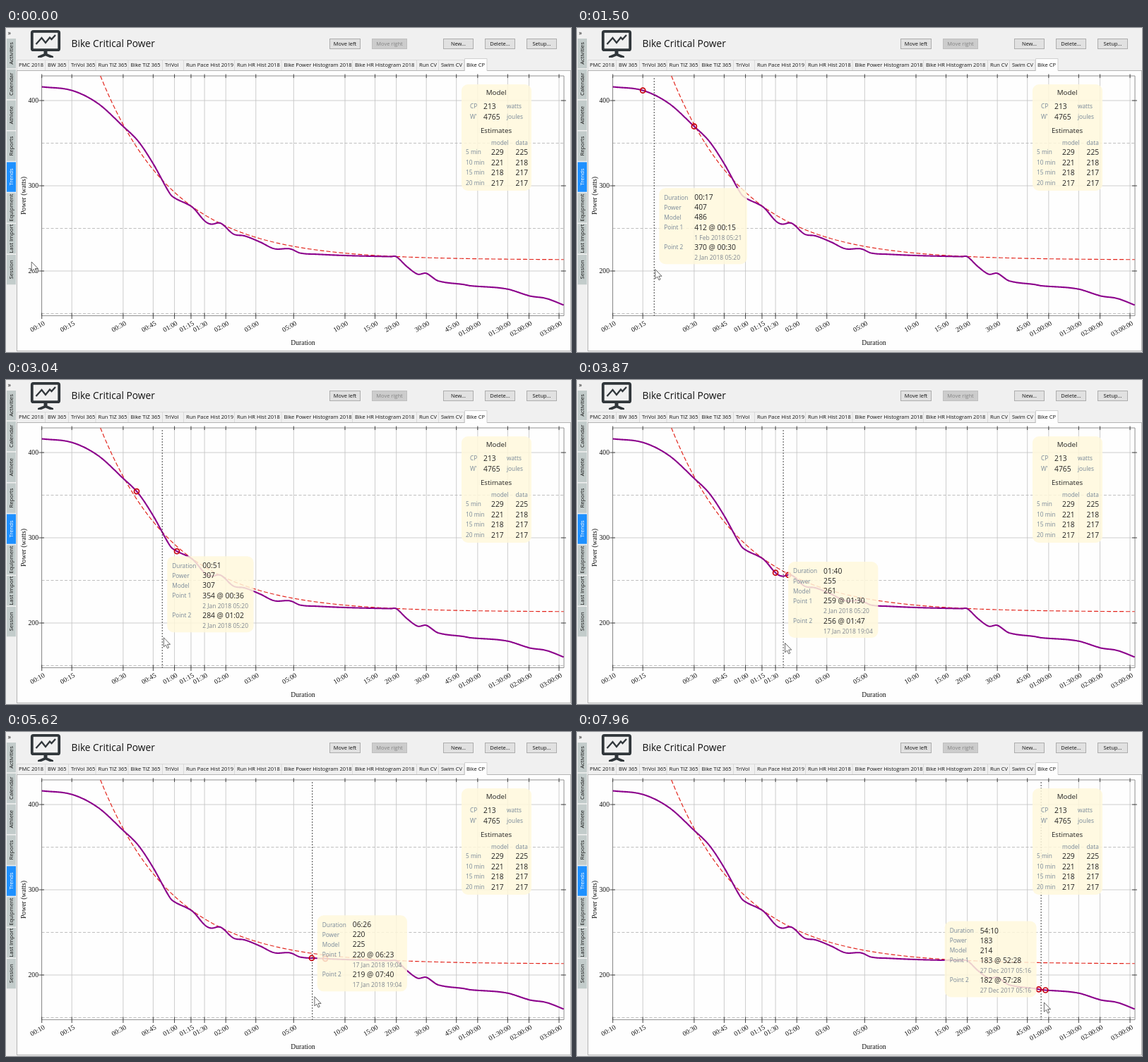
Recreate the animation shown at these times as an HTML page. Size 800x460 px, loop 8 s.

```html
<!DOCTYPE html>
<html lang="en">
<head>
<meta charset="utf-8">
<title>Bike Critical Power</title>
<style>
  html, body { margin: 0; width: 100%; height: 100%; overflow: hidden; background: #f0f0f0; }
  svg { display: block; width: 800px; height: 460px; font: 7.5px "Open Sans", "Noto Sans", sans-serif; }
  text { fill: #111; white-space: pre; }
  .serif { font: 9.7px "Liberation Serif", serif; }
  .mid { text-anchor: middle; }
  .end { text-anchor: end; }
  .title { font-size: 13.75px; }
  .label { font-size: 8.3px; fill: #778899; }
  .date { font-size: 8.5px; fill: #7d8690; }
  .value { font-size: 10.3px; fill: #222; }
  .head { font-size: 9.8px; fill: #222; }
  .card { fill: #fff8dc; fill-opacity: .84; }
  .marker { fill: none; stroke: #c8000c; stroke-width: 1.7; }
</style>
</head>
<body>
<svg viewBox="0 0 800 460" id="stage"></svg>
<script>
const LOOP = 8000, FRAMES = 102;
const PLOT = { left: 50.5, right: 790, top: 68, bottom: 408.5 };
const CP = 213, W_PRIME = 4765;

// Logarithmic time axis, linear power axis
const xOf = sec => 50.7 + 104.85 * Math.log(sec / 10);
const secAt = x => 10 * Math.exp((x - 50.7) / 104.85);
const yOf = watts => 103 + (400 - watts) * 1.21;
const wattsAt = y => 400 - (y - 103) / 1.21;
const model = sec => CP + W_PRIME / sec;

// Smooth function through [input, output] points (cubic Hermite)
function spline(points) {
  const last = points.length - 1;
  const slope = i => {
    const a = points[Math.max(i - 1, 0)], b = points[Math.min(i + 1, last)];
    return (b[1] - a[1]) / (b[0] - a[0]);
  };
  return x => {
    let i = 0;
    while (i < last - 1 && x > points[i + 1][0]) i++;
    const [x0, y0] = points[i], [x1, y1] = points[i + 1];
    const w = x1 - x0, u = (x - x0) / w, v = 1 - u;
    return y0 * v * v * (1 + 2 * u) + y1 * u * u * (1 + 2 * v)
      + w * u * v * (slope(i) * v - slope(i + 1) * u);
  };
}

// Best-power curve: its bends in stage pixels
const curveY = spline([
  [50.7, 83.5], [93, 88.6], [130, 107], [166, 139.8], [187, 160.5], [208, 192], [232, 235],
  [240, 242], [264, 254.5], [281, 273.6], [290, 278.4], [304, 277.2], [322, 292.5], [338, 295.2],
  [360, 304], [380, 313.4], [402, 313.5], [417, 319.6], [440, 321.2], [480, 323], [545, 324.6],
  [552.5, 324.6], [568, 339], [583, 349.5], [595, 348.3], [612, 359], [648, 364.2], [658, 366],
  [708, 370.3], [742, 380.5], [765, 384], [790, 393.5]
]);

// Guide position over the steps, and pointer height over the guide position
const guideX = spline([[0, 35], [11, 70.85], [27, 153.4], [49, 292.1], [71, 433.74], [86, 550.37], [101, 657.13]]);
const pointerY = spline([[35, 332], [71, 332.5], [153, 354.5], [292, 373.5], [434, 375.8], [550, 381], [657, 384]]);

// Durations with a recorded best effort
const efforts = [10, 15, 30, 36, 62, 90, 107, 128, 223, 383, 460, 1144, 1200, 3148, 3448];
function rideDate(sec) {
  if (sec === 15) return '1 Feb 2018 05:21';
  return sec < 100 ? '2 Jan 2018 05:20' : sec < 2400 ? '17 Jan 2018 19:04' : '27 Dec 2017 05:16';
}

const pad = n => String(n).padStart(2, '0');
function clock(sec) {
  const s = Math.round(sec), h = Math.floor(s / 3600);
  return (h ? pad(h) + ':' : '') + pad(Math.floor(s / 60) % 60) + ':' + pad(s % 60);
}

// Markup helpers
const text = (x, y, str, cls = '', extra = '') => `<text x="${x}" y="${y}" class="${cls}" ${extra}>${str}</text>`;
const rect = (x, y, w, h, fill, extra = '') =>
  `<rect x="${x}" y="${y}" width="${w}" height="${h}" fill="${fill}" ${extra}/>`;
const path = (d, stroke, width, extra = '') =>
  `<path d="${d}" fill="none" stroke="${stroke}" stroke-width="${width}" ${extra}/>`;
const turn = (deg, x, y) => `transform="rotate(${deg} ${x} ${y})"`;
function trace(from, fn) {
  let d = '';
  for (let x = from; x <= PLOT.right; x++) d += `${d ? 'L' : 'M'}${x.toFixed(1)} ${fn(x).toFixed(2)}`;
  return d;
}

function sidebar() {
  const names = ['Activities', 'Calendar', 'Athlete', 'Reports', 'Trends', 'Equipment', 'Last Import', 'Session'];
  return text(2.5, 10, '»', '', 'font-size="9"') + names.map((name, i) => {
    const y = 15 + i * 43.85, active = name === 'Trends';
    return rect(1, y, 13, 42.3, active ? '#1e90ff' : '#c3cccb')
      + text(10.2, y + 21, name, 'mid', `${turn(-90, 10.2, y + 21)} style="font-size:7.7px${active ? ';fill:#fff' : ''}"`);
  }).join('');
}

function header() {
  const icon = rect(36.8, 4.8, 38.4, 26.4, '#f0f0f0', 'rx="2" stroke="#30363a" stroke-width="3.8"')
    + path('M42.5 23L50.5 14L56 21L62 13.5L64.5 16L70 10', '#30363a', 2.3)
    + '<path d="M53.5 32H58.5V36.5L67 40V42H62L56 39.5L50 42H45V40L53.5 36.5Z" fill="#30363a"/>';
  const button = ([x, w, name, off]) =>
    rect(x + .5, 15.5, w, 14, off ? '#ccc' : '#e1e1e1', `stroke="${off ? '#bfbfbf' : '#adadad'}"`)
    + text(x + w / 2 + .5, 25.2, name, 'mid', off ? 'style="fill:#838383"' : '');
  return icon + text(92.5, 27, 'Bike Critical Power', 'title')
    + [[458, 43, 'Move left'], [518, 49, 'Move right', true], [619, 42, 'New...'],
       [678, 42, 'Delete...'], [737, 42, 'Setup...']].map(button).join('');
}

function tabs() {
  const items = [[18, 'PMC 2018'], [59, 'BW 365'], [92, 'TriVol 365'], [130.5, 'Run TIZ 365'],
    [176.5, 'Bike TIZ 365'], [225, 'TriVol'], [255, 'Run Pace Hist 2019'], [327, 'Run HR Hist 2018'],
    [393.5, 'Bike Power Histogram 2018'], [494, 'Bike HR Histogram 2018'], [585, 'Run CV'],
    [616, 'Swim CV'], [652, 'Bike CP']];
  return rect(15.5, 60.5, 784, 398, '#fefefe', 'stroke="#b4b4b4"')
    + path('M15.5 60V45.5H649' + items.slice(1).map(([x]) => `M${x - 3.5} 46V60`).join(''), '#dadada', 1)
    + rect(649.5, 43.5, 31.5, 18, '#fefefe') + path('M649.5 61V43.5H681V60.5', '#d0d0d0', 1)
    + items.map(([x, name]) => text(x, 55, name)).join('');
}

function chart() {
  const { left, right, top, bottom } = PLOT;
  const times = [10, 15, 30, 45, 60, 75, 90, 120, 180, 300, 600, 900, 1200, 1800, 2700, 3600, 5400, 7200, 10800];
  let grid = '', dashes = '', ticks = '', labels = '';
  for (const t of times) {
    const x = xOf(t);
    grid += `M${x} ${top}V${bottom}`;
    ticks += `M${x} 65.5V71M${x} 404.5V413`;
    labels += text(x + 5, 421, clock(t), 'serif end', turn(-30, x + 5, 421));
  }
  for (const w of [400, 300, 200]) {
    const y = yOf(w);
    grid += `M${left} ${y}H${right}`;
    ticks += `M46.5 ${y}H54M786 ${y}H793`;
    labels += text(46, y + 3.3, w, 'serif end');
    dashes += `M${left} ${yOf(w - 50)}H${right}`;
  }
  const modelStart = xOf(W_PRIME / (wattsAt(top) - CP));
  return path(grid, '#c0c0c0', .8) + path(dashes, '#b8b8b8', .9, 'stroke-dasharray="4 2.5"')
    + path(`M${left} ${top}H${right}V${bottom}H${left}Z`, '#858585', .9)
    + path(ticks, '#333', .9) + labels
    + text(28, 238, 'Power (watts)', 'serif mid', turn(-90, 28, 238))
    + text(420.5, 450, 'Duration', 'serif mid')
    + path(trace(modelStart, x => yOf(model(secAt(x)))), '#e2231a', 1.15, 'stroke-dasharray="6 3"')
    + path(trace(50.7, curveY), '#8b008b', 2.1, 'stroke-linejoin="round"');
}

function modelPanel() {
  const rows = [['5 min', 229, 225], ['10 min', 221, 218], ['15 min', 218, 217], ['20 min', 217, 217]];
  return '<rect x="645" y="80" width="99" height="151" rx="9" class="card"/>'
    + text(694, 95, 'Model', 'head mid') + text(694, 148.7, 'Estimates', 'head mid')
    + text(657, 114.3, 'CP', 'label') + text(676, 115, CP, 'value') + text(709, 114.3, 'watts', 'label')
    + text(657, 128.8, "W'", 'label') + text(676, 129.6, W_PRIME, 'value') + text(709, 128.8, 'joules', 'label')
    + text(687, 165.5, 'model', 'label') + text(721.5, 165.5, 'data', 'label')
    + rows.map(([name, a, b], i) => {
      const y = 180 + i * 14.5;
      return text(651, y - .8, name, 'label') + text(687, y, a, 'value') + text(721.5, y, b, 'value');
    }).join('');
}

// Tooltip rows: label, class of the changing text
const tipRows = [['Duration', 'value'], ['Power', 'value'], ['Model', 'value'],
  ['Point 1', 'value'], ['', 'date'], ['Point 2', 'value'], ['', 'date']];
const tipText = ([name, cls], i) => {
  const y = 17 + i * 14.1;
  return text(7, y - .6, name, 'label') + text(50, y, '', cls + ' live');
};

const stage = document.getElementById('stage');
stage.innerHTML = rect(0, 0, 800, 460, '#f0f0f0') + sidebar() + header() + tabs() + chart()
  + '<g id="hover">' + path(`M0 71V${PLOT.bottom}`, '#333', .9, 'id="guide" stroke-dasharray="2 2"')
  + '<circle r="3.5" class="marker"/><circle r="3.5" class="marker"/></g>'
  + modelPanel()
  + '<g id="tip"><rect id="tipCard" height="108" rx="9" class="card"/>' + tipRows.map(tipText).join('') + '</g>'
  + '<path id="cursor" d="M0 0V13.2L3 10.4L5.2 15.2L7.3 14.2L5.1 9.6H9.2Z" fill="#fff" stroke="#444" stroke-width=".8"/>';

const [hover, guide, tip, tipCard, cursor] =
  ['hover', 'guide', 'tip', 'tipCard', 'cursor'].map(id => document.getElementById(id));
const markers = stage.querySelectorAll('.marker');
const live = [...stage.querySelectorAll('.live')];

function draw(step) {
  const x = guideX(step), y = pointerY(x);
  const inside = x >= xOf(efforts[0]);
  cursor.setAttribute('transform', `translate(${x + 1 + x * .005} ${y})`);
  hover.style.display = tip.style.display = inside ? '' : 'none';
  if (!inside) return;

  guide.setAttribute('transform', `translate(${x} 0)`);
  const sec = secAt(x), next = efforts.findIndex(s => s > sec);
  const watts = px => Math.round(wattsAt(curveY(px)));
  const lines = [clock(sec), watts(x), Math.round(model(sec))];
  [efforts[next - 1], efforts[next]].forEach((s, k) => {
    const px = xOf(s);
    markers[k].setAttribute('cx', px);
    markers[k].setAttribute('cy', curveY(px));
    lines.push(`${watts(px)} @ ${clock(s)}`, rideDate(s));
  });
  live.forEach((el, k) => { el.textContent = lines[k]; });

  // The tooltip moves to the other side when it would leave the plot
  const width = 57.5 + Math.max(...live.map(el => el.getComputedTextLength()));
  const fits = x + 7 + width <= PLOT.right;
  tipCard.setAttribute('width', width);
  tip.setAttribute('transform', `translate(${fits ? x + 7 : x - 6.5 - width} ${y - 115.5})`);
}

let shown = -1;
const start = performance.now();
function tick() {
  const time = (performance.now() - start) % LOOP;
  const step = Math.floor(time * FRAMES / LOOP);
  if (step !== shown) draw(shown = step);
  requestAnimationFrame(tick);
}
tick();
</script>
</body>
</html>
```
